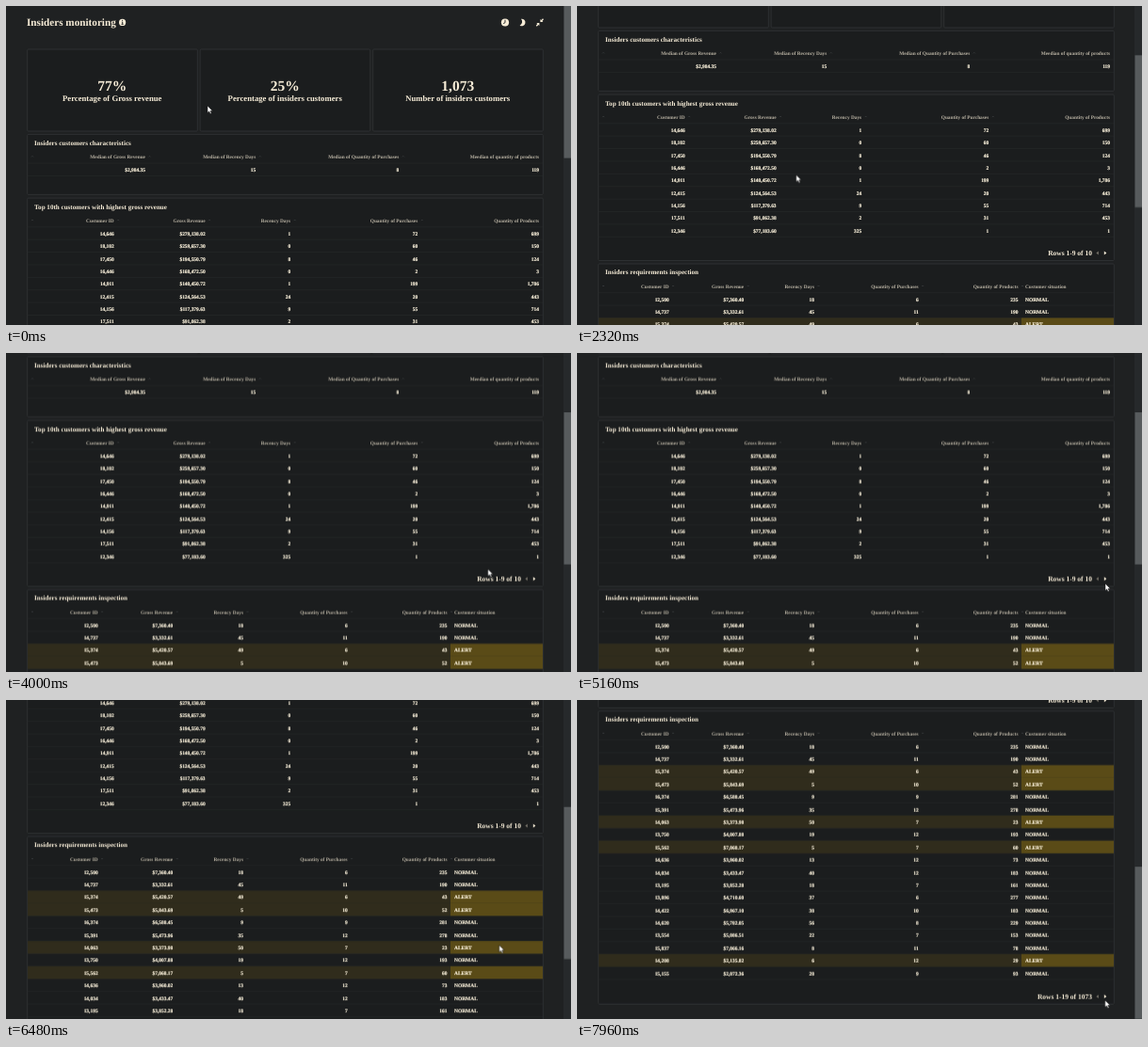
Animation, 600 px wide and 339 px high, one loop 8000 ms. Source, as an HTML page:

```html
<!DOCTYPE html>
<html lang="en">
<head>
<meta charset="utf-8">
<title>Insiders monitoring</title>
<style>
html, body { margin: 0; width: 100%; height: 100%; overflow: hidden; background: #1f2122; }
svg { display: block; width: 600px; height: 339px; }
text { font-family: "Liberation Serif", "Times New Roman", serif; font-weight: bold; fill: #f6ecd7; text-rendering: geometricPrecision; }
.card { fill: #1b1d1e; stroke: #36393a; stroke-width: .7; }
.rule { stroke: #272a2b; stroke-width: .6; }
.head { fill: #bab3a4; }
.cell { fill: #fff5df; stroke: #fff5df; stroke-width: .16; }
.sort { fill: none; stroke: #45484a; stroke-width: .6; }
.alert { fill: #302c1c; }
.flag { fill: #5a4b17; }
</style>
</head>
<body>
<svg viewBox="0 0 600 339">
  <rect width="600" height="339" fill="#1f2122"/>
  <g id="page"></g>
  <rect x="592" width="8" height="339" fill="#26292b"/>
  <rect id="thumb" x="592.5" width="7.5" height="161.6" fill="#575b5d"/>
  <path id="cursor" d="M0 0V7.4L1.7 5.9 2.9 8.5 4.2 7.9 3 5.4H5.3Z" fill="#fff" stroke="#111" stroke-width=".5"/>
</svg>
<script>
const LOOP = 8000, ROW = 13.385, LEFT = 23, RIGHT = 570, STATUS = 472;
const page = document.getElementById('page');

function add(tag, attrs, content = '') {
  const el = document.createElementNS('http://www.w3.org/2000/svg', tag);
  for (const key in attrs) el.setAttribute(key, attrs[key]);
  el.textContent = content;
  page.append(el);
}

// y is the middle of the capitals
const label = (content, x, y, size, anchor = 'start', cls = '') =>
  add('text', { x, y: y + size * .36, 'font-size': size, 'text-anchor': anchor, class: cls }, content);
const box = (cls, x, y, width, height, rx = 0) => add('rect', { class: cls, x, y, width, height, rx });
const shape = (d, attrs) => add('path', { d, ...attrs });

function pager(content, y) {
  label(content, 547, y, 7.5, 'end');
  shape(`M553.8 ${y - 1.9}v3.8l-2.4-1.9z`, { fill: '#77736a' });
  shape(`M559.8 ${y - 2}v4l2.6-2z`, { fill: '#f6ecd7' });
}

// A column without a right edge is the left-aligned status
function table({ title, top, height, heads, edges, rows }) {
  const headY = top + 24, firstY = top + 37.4;
  const sort = x => shape(`M${x} ${headY}l1-1 1 1`, { class: 'sort' });
  const cellText = (content, i, y, size, cls) =>
    label(content, edges[i] ?? STATUS + 4, y, size, edges[i] ? 'end' : 'start', cls);

  box('card', LEFT - .3, top, 547.6, height, 1);
  label(title, 30, top + 8.9, 7.1);
  sort(27);
  heads.forEach((head, i) => {
    cellText(head, i, headY, 5.33, 'head');
    if (edges[i] < 560) sort(edges[i] + 3.5);
  });
  shape(`M${LEFT} ${firstY - ROW / 2}H${RIGHT}`, { class: 'rule' });
  rows.forEach((cells, r) => {
    const y = firstY + r * ROW, bandY = y - ROW / 2;
    shape(`M${LEFT} ${y + ROW / 2}H${RIGHT}`, { class: 'rule' });
    if (cells.includes('ALERT')) {
      box('alert', LEFT, bandY, STATUS - LEFT, ROW);
      box('flag', STATUS, bandY, RIGHT - STATUS, ROW);
    }
    cells.forEach((cell, i) => cellText(cell, i, y + .3, 5.45, 'cell'));
  });
}

function header() {
  const cream = { fill: '#f6ecd7' };
  const line = { fill: 'none', stroke: '#1f2122', 'stroke-width': .9 };
  label('Insiders monitoring', 22, 16.7, 11.2);
  add('circle', { cx: 123.6, cy: 17.4, r: 3.6, ...cream });
  shape('M123.6 14.9v1.1M122.9 17h.8v2.4M122.5 19.4h2.2', line);
  add('circle', { cx: 530, cy: 17.5, r: 4.1, ...cream });
  shape('M530 14.8v2.9l-1.8.9', line);
  shape('M547 13.8A3.8 3.8 0 1 1 545.6 20.7A4.4 4.4 0 0 0 547 13.8Z', cream);
  shape('M567.4 17V13.9L568.4 14.9 570 13.3 571 14.3 569.4 15.9 570.5 17ZM566.4 18V21.1L565.4 20.1 563.8 21.7 562.8 20.7 564.4 19.1 563.3 18Z', cream);
}

function summary(value, caption, i) {
  const x = LEFT - .3 + i * 183.5;
  box('card', x, 46, 180.6, 87, 1);
  label(value, x + 90, 84, 15.5, 'middle');
  label(caption, x + 90, 98.3, 8.7, 'middle');
}

let seed = 7;
function between(low, high) {
  seed = (seed * 16807) % 2147483647;
  return Math.floor(low + (high - low) * seed / 2147483647);
}

function customer(_, i) {
  const alert = [2, 3, 6, 8, 17].includes(i);
  return [
    between(12500, 16700).toLocaleString('en-US'),
    '$' + (between(109000, 790000) / 100).toLocaleString('en-US', { minimumFractionDigits: 2 }),
    String(between(2, 60)),
    String(between(5, 13)),
    String(alert ? between(10, 100) : between(60, 300)),
    alert ? 'ALERT' : 'NORMAL'
  ];
}

header();
summary('77%', 'Percentage of Gross revenue', 0);
summary('25%', 'Percentage of insiders customers', 1);
summary('1,073', 'Number of insiders customers', 2);

table({
  title: 'Insiders customers characteristics', top: 136.4, height: 64,
  heads: ['Median of Gross Revenue', 'Median of Recency Days', 'Median of Quantity of Purchases', 'Meedian of quantity of products'],
  edges: [148, 265.3, 417.3, 566],
  rows: [['$2,984.35', '15', '8', '119']]
});

const columns = ['Customer ID', 'Gross Revenue', 'Recency Days', 'Quantity of Purchases', 'Quantity of Products'];

table({
  title: 'Top 10th customers with highest gross revenue', top: 204.1, height: 176.4,
  heads: columns,
  edges: [114.7, 211.6, 302.2, 437.3, 566],
  rows: `14,646 $279,138.02 1 72 699
    18,102 $259,657.30 0 60 150
    17,450 $194,550.79 8 46 124
    16,446 $168,472.50 0 2 3
    14,911 $140,450.72 1 199 1,786
    12,415 $124,564.53 24 20 443
    14,156 $117,379.63 9 55 714
    17,511 $91,062.38 2 31 453
    12,346 $77,183.60 325 1 1`.split('\n').map(line => line.trim().split(' '))
});
pager('Rows 1-9 of 10', 372.5);

table({
  title: 'Insiders requirements inspection', top: 384, height: 311.3,
  heads: [...columns, 'Customer situation'],
  edges: [97.6, 177.2, 252, 362.7, 468.5],
  rows: Array.from({ length: 19 }, customer)
});
pager('Rows 1-19 of 1073', 687.3);

const EASE_OUT = 'cubic-bezier(.333, .667, .667, 1)';
const MIDDLE = 132.5, END = 372.3;
const scroll = [[0, 0], [1980, 0], [2560, MIDDLE], [6246, MIDDLE], [7172, END], [LOOP, END]];
const pointer = [[0, 214, 106], [1860, 54, 152], [2920, 465, 215], [5140, 561, 245], [5960, 561, 245],
  [6440, 523.7, 260], [6880, 523.7, 265], [7560, 564, 315], [7920, 560.7, 319], [LOOP, 560.7, 319]];

function play(id, steps, easing, place) {
  const frames = steps.map(([ms, ...at]) => {
    const [x, y] = place(...at);
    return { offset: ms / LOOP, easing, transform: `translate(${x}px, ${y}px)` };
  });
  document.getElementById(id).animate(frames, { duration: LOOP, iterations: Infinity });
}

play('page', scroll, EASE_OUT, top => [0, -top]);
play('thumb', scroll, EASE_OUT, top => [0, top * .476]);
play('cursor', pointer, 'linear', (x, y) => [x, y]);
</script>
</body>
</html>
```
